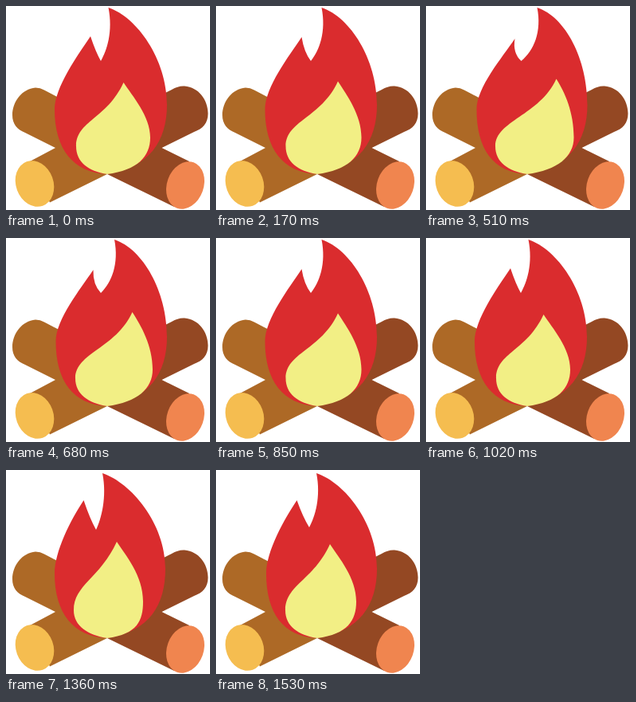
These frames come from a looping animation (256x256 px, 1.7 s). An HTML page:

```html
<!DOCTYPE html>
<html lang="en">
<head>
<meta charset="utf-8">
<title>Campfire</title>
<style>
  html, body { margin: 0; width: 100%; height: 100%; overflow: hidden; background: #fff; }
  svg { display: block; width: 100vw; height: 100vh; }
</style>
</head>
<body>
<svg viewBox="0 0 256 256">
  <path fill="#ad6926" d="M127 147L48 105.500Q43 102.500 37 102.500C20 104 8 120 8 137C8 148 14 155 24 159L62 178L30 195L55 246.500L127 211Z"/>
  <path fill="#944823" d="M127 145L208 105Q216 100 224 100.500C242 102 253.500 118 253.500 135C253.500 147 247 154 236 158L195.500 178L230 195L211 252L127 211Z"/>
  <ellipse fill="#f5bd50" cx="36" cy="223" rx="23.500" ry="29.500" transform="rotate(-20 36 223)"/>
  <ellipse fill="#f0854f" cx="225" cy="225" rx="23" ry="30.500" transform="rotate(20 225 225)"/>
  <path id="flame" fill="#da2c2e"/>
  <path id="core" fill="#f2ef85"/>
</svg>
<script>
const STEP = 170;
const flame = document.getElementById('flame');
const core = document.getElementById('core');

// Poses of the flame, leaning from left to right
const poses = [
  { tip: [121, 4], peak: [97.5, 38], notch: [113, 75], bend: 105, left: 61, right: 200, heart: [139, 90], inner: [85, 172] },
  { tip: [126, 4], peak: [101.5, 38], notch: [117, 72], bend: 109, left: 63, right: 202, heart: [143, 93], inner: [87, 176] },
  { tip: [128.5, 2], peak: [106, 38], notch: [119, 69], bend: 112.5, left: 61, right: 202, heart: [147.5, 96], inner: [88, 181] },
  { tip: [132.5, 2], peak: [107.5, 39], notch: [119, 69], bend: 110.5, left: 61.5, right: 202, heart: [153, 94.5], inner: [87.5, 182.5] },
  { tip: [136, 2], peak: [109.5, 40], notch: [119, 69], bend: 109, left: 62.5, right: 202, heart: [158.5, 93], inner: [87, 184] },
  { tip: [139.5, 2], peak: [111.5, 41], notch: [119.5, 69], bend: 108.5, left: 63.5, right: 202.5, heart: [163.5, 91.5], inner: [87, 185.5] }
];
const order = [2, 3, 4, 5, 4, 3, 2, 1, 0, 1];

function flamePath({ tip: [tx, ty], peak: [px, py], notch: [nx, ny], bend, left, right }) {
  return `M${tx} ${ty}C${tx + 36} ${ty + 12} ${right} 67 ${right} 124` +
    `C${right} 169 180 203 127 211C84 209 ${left} 179 ${left} 130` +
    `C${left} 102 ${px - 16} ${py + 24} ${px} ${py}` +
    `Q${bend} ${(py + ny) / 2 + 4} ${nx} ${ny}` +
    `C${nx + (tx - nx) * 0.8} ${ny - 13} ${tx + 6} ${ty + 30} ${tx} ${ty}Z`;
}

function corePath({ heart: [x, y], inner: [l, r] }) {
  return `M${x} ${y}C${x + 11} ${y + 17} ${r} ${y + 42} ${r} 165` +
    `C${r} 189 165 206 127 211C103 207 ${l} 196 ${l} 176` +
    `C${l} 144 ${x - 21} ${y + 46} ${x} ${y}Z`;
}

function draw(now) {
  const pose = poses[order[Math.floor(now / STEP) % order.length]];
  flame.setAttribute('d', flamePath(pose));
  core.setAttribute('d', corePath(pose));
}

const start = performance.now();
function tick() {
  draw(performance.now() - start);
  requestAnimationFrame(tick);
}
tick();
</script>
</body>
</html>
```
